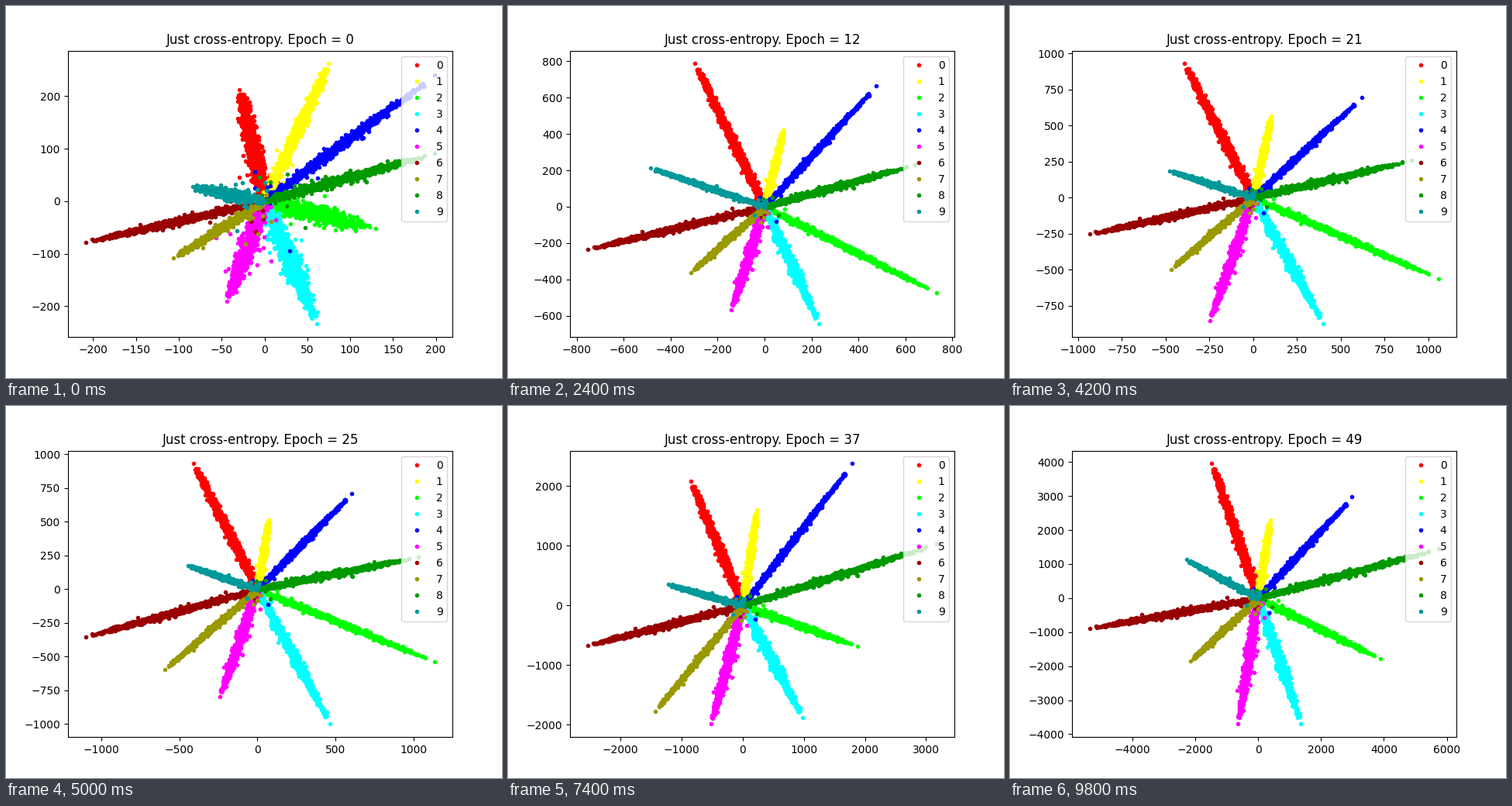
These frames come from a looping animation (640x480 px, 10000 ms). A matplotlib script:

```python
import numpy as np
import matplotlib.pyplot as plt
from matplotlib.animation import FuncAnimation

EPOCHS = 50
POINTS = 1000
STRAYS = 18
AXES_PX = np.array([496.0, 369.6])
MARGIN = 0.05

COLORS = ["#ff0000", "#ffff00", "#00ff00", "#00ffff", "#0000ff",
          "#ff00ff", "#990000", "#999900", "#009900", "#009999"]

# Far end of every class ray at a few epochs, as x + yj
KEYS = [0, 5, 12, 17, 25, 37, 49]
TIPS = [
    [-29+212j, -115+612j, -297+787j, -379+928j, -409+931j, -851+2078j, -1466+3952j],
    [75+262j, 125+469j, 80+423j, 138+615j, 72+516j, 229+1597j, 382+2289j],
    [130-52j, 396-253j, 734-475j, 988-582j, 1134-539j, 1880-688j, 3904-1788j],
    [61-234j, 128-409j, 231-646j, 344-769j, 464-1000j, 978-1883j, 1367-3702j],
    [199+240j, 294+325j, 476+667j, 632+676j, 603+712j, 1792+2377j, 2993+2973j],
    [-44-190j, -97-437j, -142-569j, -257-918j, -241-798j, -521-1990j, -630-3690j],
    [-209-78j, -387-122j, -754-235j, -794-176j, -1099-354j, -2541-670j, -5357-890j],
    [-106-108j, -168-216j, -314-363j, -371-412j, -593-597j, -1436-1779j, -2155-1856j],
    [199+91j, 399+69j, 641+231j, 787+269j, 1030+239j, 3177+1026j, 5751+1446j],
    [-84+28j, -203+134j, -486+214j, -514+198j, -444+176j, -1220+351j, -2278+1128j],
]
LOG_TIPS = np.log(np.array(TIPS))

# Per class: ray thickness in pixels, its factor at the start, thinning at the tip
WIDTH = [2.5, 1.6, 1.6, 2.4, 1.4, 2.4, 1.9, 1.3, 1.7, 1.1]
EARLY = [2.0, 2.0, 3.3, 2.2, 1.9, 2.0, 1.2, 1.6, 1.5, 2.7]
TAPER = [1.7, 1.6, 2.4, 1.9, 2.2, 1.8, 1.8, 1.8, 2.3, 1.6]


def make_class(rng, width, taper):
    """Positions along the ray, sideways offsets and stray points."""
    along = 0.97 * rng.beta(1.8, taper, POINTS)
    shape = 1.6 * np.sqrt(along) * (1.12 - along) + 0.12
    side = rng.standard_t(9, POINTS) * width * shape
    along[0], side[0] = 1, 0
    angle = rng.normal(0, 0.7, STRAYS)
    reach = np.minimum(rng.exponential(8, STRAYS), 26)
    return along, side, reach * np.exp(1j * angle)


rng = np.random.default_rng(7)
clouds = [make_class(rng, w, t) for w, t in zip(WIDTH, TAPER)]

fig, ax = plt.subplots(figsize=(6.4, 4.8), dpi=100)
lines = [ax.plot([], [], ".", color=c, label=str(i))[0]
         for i, c in enumerate(COLORS)]
ax.legend(loc="upper right")
title = ax.set_title("", x=0.501)


def limits(values):
    low, high = values.min(), values.max()
    pad = MARGIN * (high - low)
    return low - pad, high + pad


def draw(epoch):
    tips = np.exp([np.interp(epoch, KEYS, row) for row in LOG_TIPS])
    xlim, ylim = limits(tips.real), limits(tips.imag)
    sx, sy = AXES_PX / (xlim[1] - xlim[0], ylim[1] - ylim[0])
    unrest = np.interp(epoch, [0, 5, 12], [1, 0.15, 0])

    for line, tip, early, cloud in zip(lines, tips, EARLY, clouds):
        along, side, stray = cloud
        ray = tip.real * sx + 1j * tip.imag * sy
        unit = ray / abs(ray)
        spread = 1 + unrest * (early - 1)
        body = ray * along + 1j * unit * side * spread
        pts = np.concatenate([body, unit * stray * (1 + 2 * unrest)])
        line.set_data(pts.real / sx, pts.imag / sy)

    ax.set_xlim(xlim)
    ax.set_ylim(ylim)
    title.set_text(f"Just cross-entropy. Epoch = {epoch}")
    return lines


anim = FuncAnimation(fig, draw, frames=EPOCHS, interval=200,
                     repeat=True, repeat_delay=0, blit=False)
plt.show()
```
